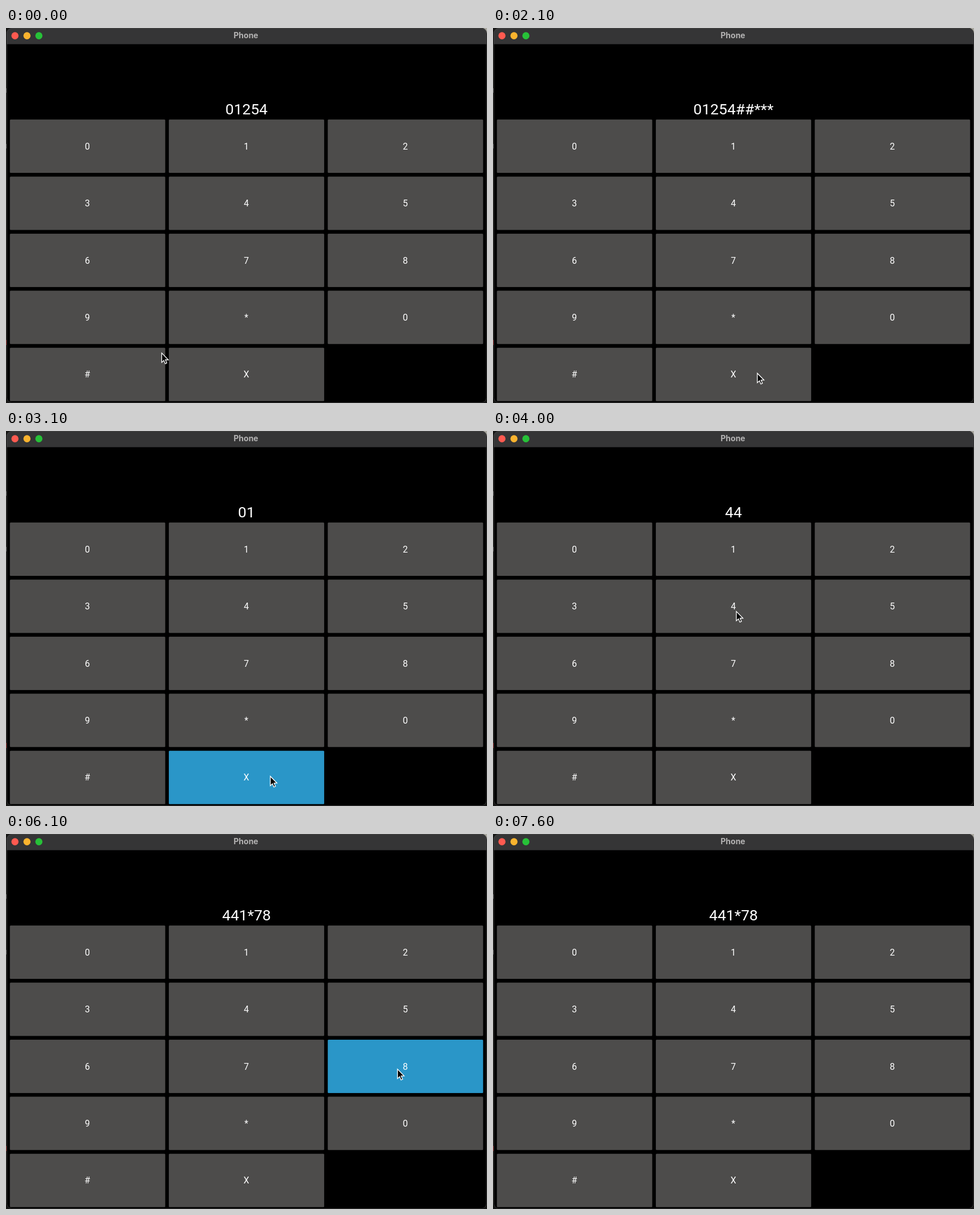
These frames come from a looping animation (848 by 660 pixels, 8200 ms). An HTML page:

```html
<!DOCTYPE html>
<html lang="en">
<head>
<meta charset="utf-8">
<title>Phone</title>
<style>
  html, body { margin: 0; width: 100%; height: 100%; overflow: hidden; background: #161615; }
  svg { display: block; }
  text { font-family: Roboto, sans-serif; fill: #fff; text-anchor: middle; }
  .title { font: 700 14px Inter, sans-serif; fill: #b4b3b3; }
  .key { fill: #4d4c4b; stroke: #0002; }
  .key.down { fill: #2a96c8; }
</style>
</head>
<body>
<svg width="848" height="660" viewBox="0 0 848 660">
  <path d="M836 0h12v10z" fill="#a9a8a0"/>
  <path d="M0 106v8M0 204v8" stroke="#555" stroke-width="2"/>
  <path d="M0 549v9" stroke="#8a2424" stroke-width="2"/>
  <clipPath id="win"><rect x="1" width="846.5" height="660" rx="9"/></clipPath>
  <g clip-path="url(#win)">
    <rect width="848" height="660"/>
    <rect width="848" height="28.5" fill="#353536"/>
  </g>
  <rect x="1.5" y=".5" width="845.5" height="659" rx="9" fill="none" stroke="#454544" stroke-width=".8"/>
  <circle cx="15.8" cy="13.6" r="6.3" fill="#ff5a50"/>
  <circle cx="37" cy="13.6" r="6.3" fill="#fab32e"/>
  <circle cx="58" cy="13.6" r="6.3" fill="#27c138"/>
  <text class="title" x="423" y="18">Phone</text>
  <text id="display" x="424" y="151.5" font-size="26.5"></text>
  <g id="pad"></g>
  <path id="cursor" d="M0 0V16.6L3.8 13.1 6.2 18.9 9 17.7 6.6 12H11.7Z" stroke="#fff" stroke-width="1.3"/>
</svg>
<script>
const LOOP = 8200, STEP = 100;
const KEYS = "0123456789*0#X";
const $ = id => document.getElementById(id);

function center(key) {
  const i = typeof key === "number" ? key : KEYS.indexOf(key);
  return [143.8 + i % 3 * 280.2, 208.1 + Math.floor(i / 3) * 100.4];
}

$("pad").innerHTML = [...KEYS].map((k, i) => {
  const [x, y] = center(i);
  return `<rect class="key" x="${x - 137}" y="${y - 47}" width="274" height="94" rx="1.5"/>
    <text x="${x - .3}" y="${y + 5.6}" font-size="15.9">${k}</text>`;
}).join("");
const keys = document.querySelectorAll(".key");

// Each visit taps one key: taps, first tap time, pointer offset from the key's centre
const visits = [
  ["##", 300, 70, -6], ["***", 900, 2.5, -6], ["X".repeat(10), 2200, 42, -2],
  ["44", 3600, 5, 9], ["1", 4400, 6, 6], ["*", 5000, 37, 9.5],
  ["7", 5750, 20, 9], ["8", 6100, -14, 5], ["*", 6500, 101, -11], ["X", 7000, 46, -5]
].map(([taps, at, dx, dy]) => {
  const key = taps[0], [x, y] = center(key);
  const gap = key === "X" ? 125 : 250, hold = gap * .56;
  const times = [...taps].map((_, i) => at + i * gap);
  return { key, times, hold, x: x + dx, y: y + dy, arrive: at - 100, leave: times.at(-1) + hold };
});

const stops = [
  { x: 274.5, y: 572, leave: 0 }, ...visits,
  { x: 760, y: 680, arrive: 7500 }
];

// Rest at each stop, then ease quickly to the next one
function pointer(t) {
  const i = stops.findIndex(s => s.arrive > t);
  if (i < 0) return [stops.at(-1).x, stops.at(-1).y];
  const a = stops[i - 1], b = stops[i];
  const from = Math.max(a.leave, b.arrive - 250);
  const u = Math.max(0, (t - from) / (b.arrive - from)), e = u * u * (3 - 2 * u);
  return [a.x + (b.x - a.x) * e, a.y + (b.y - a.y) * e];
}

function draw(now) {
  const t = Math.floor(now % LOOP / STEP) * STEP;
  let number = "01254", down = -1;
  for (const { key, times, hold } of visits) {
    for (const at of times.filter(at => at <= t)) {
      number = key === "X" ? number.slice(0, -1) : number + key;
      if (t < at + hold) down = KEYS.indexOf(key);
    }
  }
  $("display").textContent = number;
  keys.forEach((k, i) => k.classList.toggle("down", i === down));
  $("cursor").setAttribute("transform", `translate(${pointer(t)})`);
}

const start = performance.now();
function tick() {
  draw(performance.now() - start);
  requestAnimationFrame(tick);
}
tick();
</script>
</body>
</html>
```
